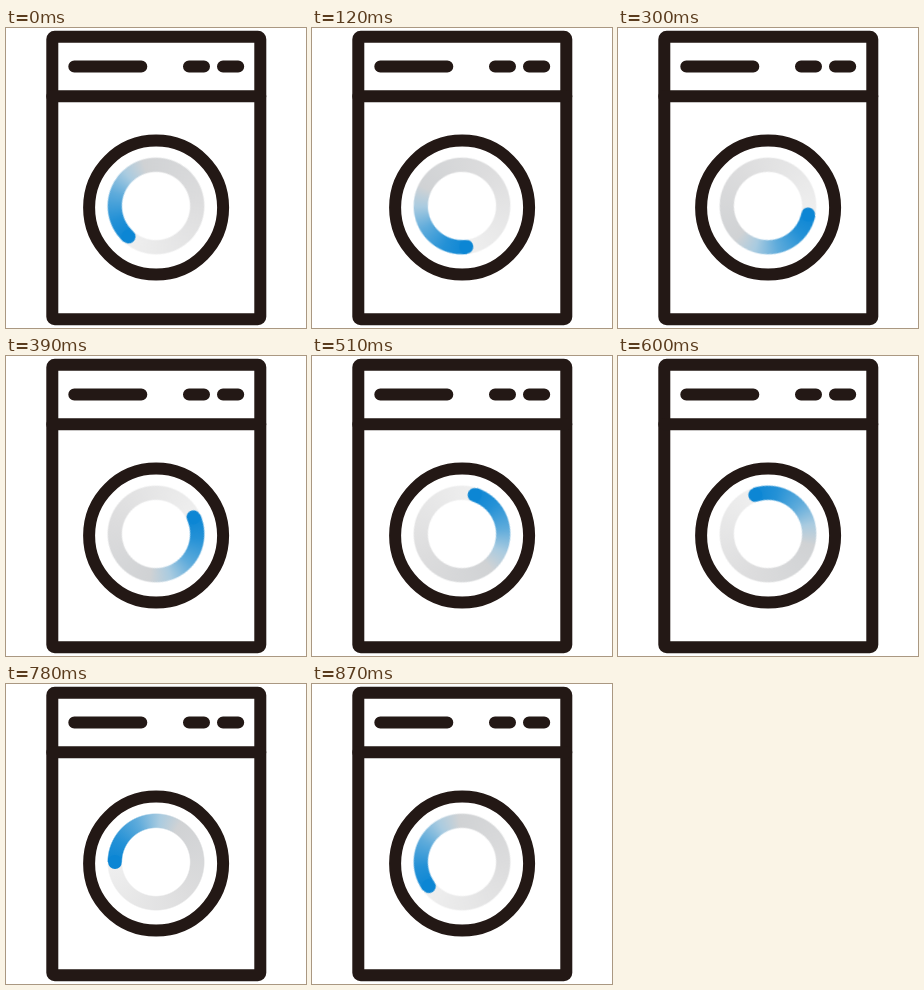
Write an HTML page that moves like this. It is 300x300 px and loops after 0.9 s.

```html
<!DOCTYPE html>
<html lang="en">
<head>
<meta charset="utf-8">
<title>Washer</title>
<style>
  html, body { margin: 0; width: 100%; height: 100%; overflow: hidden; background: #fff; }
  svg { position: absolute; left: 0; top: 0; filter: blur(.55px); }
  .ring {
    position: absolute; left: 101px; top: 129px; width: 98px; height: 98px;
    background: conic-gradient(from 90deg,
      #0c86d4 0deg, #2491d6 30deg, #5eabdb 65deg, #a9cbe0 95deg,
      #d0d2d4 122deg, #dcdcdd 220deg, #eeeeee 350deg);
    -webkit-mask: radial-gradient(circle, #0000 33.4px, #000 34.8px 47.6px, #0000 49px);
    mask: radial-gradient(circle, #0000 33.4px, #000 34.8px 47.6px, #0000 49px);
    animation: spin 900ms steps(30, end) infinite;
  }
  .ring::after {
    content: ""; position: absolute; left: 83.2px; top: 42px;
    width: 14px; height: 14px; border-radius: 50%; background: #0c86d4;
  }
  @keyframes spin {
    from { transform: rotate(132deg); }
    to { transform: rotate(-228deg); }
  }
</style>
</head>
<body>
<svg width="300" height="300" viewBox="0 0 300 300" fill="none" stroke="#231815" stroke-width="12" stroke-linecap="round" stroke-linejoin="round">
  <rect x="46.3" y="8.8" width="208" height="282.5" rx="2.5"/>
  <path d="M46.3 68.2H254.3M68.3 38.6H135.3M183 38.6H198M217 38.6H232.2"/>
  <circle cx="150.1" cy="179.6" r="67"/>
</svg>
<div class="ring"></div>
</body>
</html>
```
